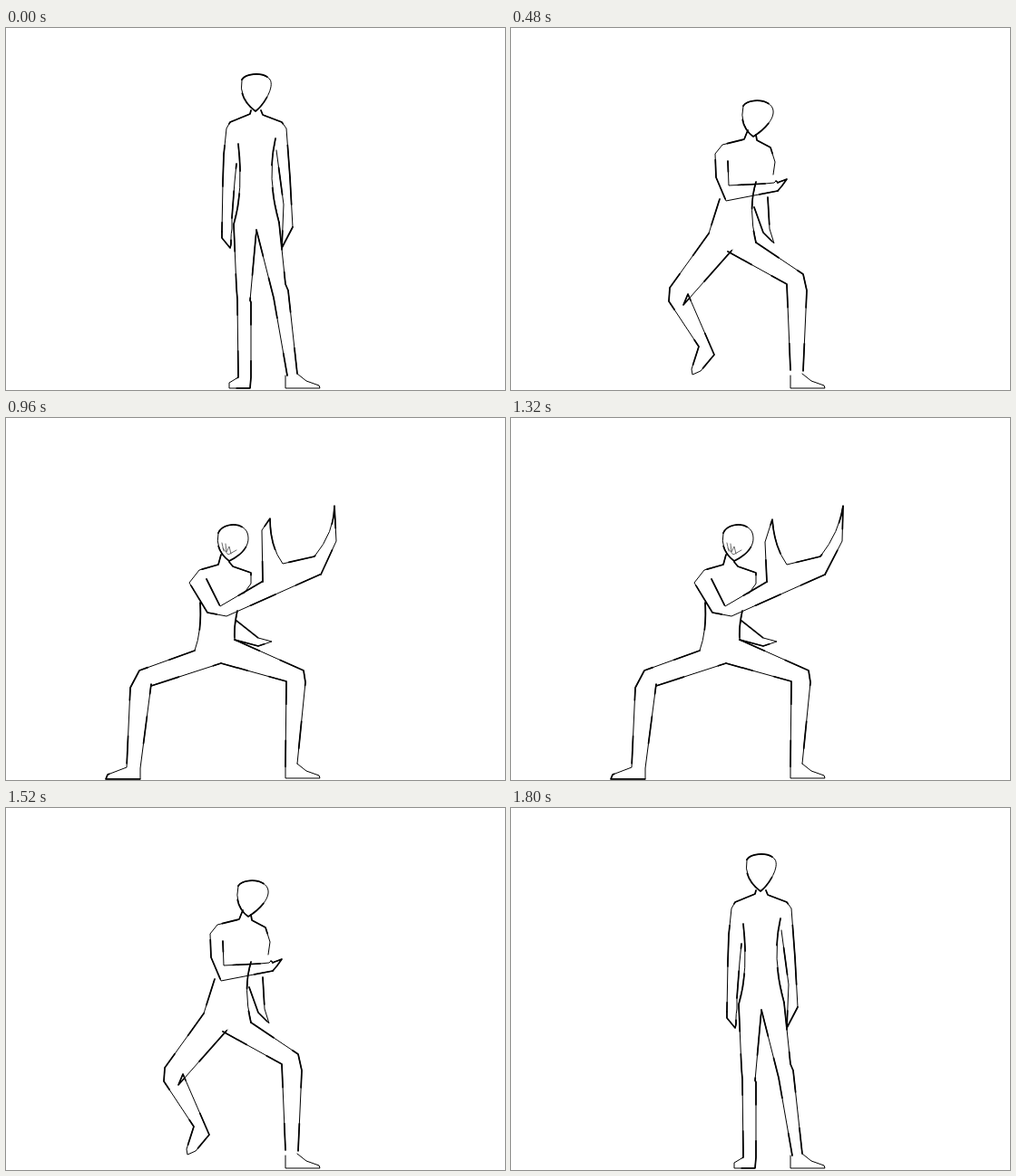
Write an HTML page without scripts that moves like this. It is 550 by 400 pixels and loops after 2 s.

```html
<!DOCTYPE html>
<html lang="en">
<head>
<meta charset="utf-8">
<title>Fighting stance</title>
<style>
html, body { margin: 0; width: 100%; height: 100%; overflow: hidden; background: #fff; }
svg { display: block; width: 100%; height: 100%; }
path { fill: none; stroke: #000; stroke-linecap: round; stroke-linejoin: round; }

/* Limb poses: --a stand, --b crouch, --g step, --d strike, --e guard */
.pose { --e: var(--d); d: var(--a); animation: pose 2s step-end infinite; }
@keyframes pose {
  0% { d: var(--a); }
  10% { d: var(--a); animation-timing-function: steps(2, jump-both); }
  16% { d: var(--b); }
  20% { d: var(--b); animation-timing-function: steps(1, jump-both); }
  24% { d: var(--g); }
  28% { d: var(--g); animation-timing-function: steps(2, jump-both); }
  32% { d: var(--d); }
  34% { d: var(--e); }
  66% { d: var(--d); }
  70% { d: var(--d); animation-timing-function: steps(2, jump-both); }
  76% { d: var(--g); }
  80% { d: var(--g); animation-timing-function: steps(3, jump-both); }
  90%, 100% { d: var(--a); }
}

/* Pen pressure: the same line again, heavier and broken */
.heavy { stroke-width: 1.7; stroke-dasharray: 30 25 45 40; }

.head {
  --a: path("M260 57C265 49 286 49 291 57S285 84 275 92Q256 78 260 57");
  --b: path("M259 65C264 57 285 57 290 66S284 92 273 100Q255 86 259 65");
  --g: path("M256 86C261 78 283 78 288 88S280 112 267 120Q251 108 256 86");
  --d: path("M234 127C239 115 262 115 266 127S262 150 246 158Q230 146 234 127");
}
.torso {
  --a: path("M256 128Q262 180 251 217M297 122Q287 165 301 215");
  --b: path("M254 131Q253 160 262 222M294 138Q287 165 304 235");
  --g: path("M230 189Q224 208 218 227M270 170Q261 200 270 237");
  --d: path("M214 204Q216 235 208 257M255 213Q251 230 252 245");
}
.rear-arm {
  --a: path("M281 91 283 96 304 104 309 111 313 165M313 165 316 220 304 243 306 195 298 135");
  --b: path("M279 98 280 103 299 109 307 119 311 166M311 166 313 224 305 240 301 190 296 134");
  --g: path("M270 118 271 124 286 132 291 148 289 162M283 187 285 222 290 238 278 226 268 198");
  --d: path("M246 159 250 164 270 171 270 183 262 194M254 224 278 243 293 247 278 252 252 245");
}
.lead-arm {
  --a: path("M270 91 269 95 247 104 243 111 240 140 239 170 238 225M249 210 252 170 254 150");
  --b: path("M268 98 267 104 253 108 241 122 243 150 245 172 251 222M258 200 257 168 255 130");
  --g: path("M261 113 257 123 233 129 225 139 226 165 237 191 294 180M280 172 240 174 239 147");
  --d: path("M237 151 234 162 213 168 202 182 222 215 243 219 346 173M282 181 236 208 221 178");
}
.hand {
  --a: path("M238 225 238 232 247 243Q248 240 248 238L248 232Q248 228 249 222L249 218 249 210");
  --b: path("M251 222 257 230 263 237Q263 234 262 230L261 226Q260 222 259 215L259 208 258 200");
  --g: path("M294 180 299 174 304 167Q299 169 296 170L294 171Q293 169 292 169L290 171 280 172");
  --d: path("M346 173 365 136 366 97Q362 126 341 153L304 162Q290 142 288 112L280 137 282 181");
  --e: path("M347 173 364 136 362 97Q362 126 340 153L305 161Q291 142 291 111L282 124 283 181");
}
.rear-leg {
  --a: path("M251 217 254 287 255 300 256 386 246 392 246 398 269 398 270 386 270 303 269 301 276 223");
  --b: path("M251 218 239 295 244 305 255 380 247 392 246 398 266 398 268 380 258 292 260 292 273 227");
  --g: path("M218 227 175 287 174 302 207 352 199 377 200 383 209 379 224 361 195 294 190 306 244 245");
  --d: path("M208 257 147 279 137 298 133 386 112 394 110 399 148 399 148 387 160 294 160 296 237 271");
}
.front-leg {
  --a: path("M301 215 308 283 311 290 321 382M276 223 295 298 310 384");
  --b: path("M304 235 314 276 316 283 321 382M273 227 299 294 309 384");
  --g: path("M270 237 322 272 326 290 322 379M239 247 304 283 308 378");
  --d: path("M252 245 328 279 330 292 321 382M237 271 309 291 308 385");
}

.face { stroke: #444; stroke-width: .8; animation: face 2s step-end infinite; }
@keyframes face {
  0%, 70% { visibility: hidden; }
  32% { visibility: visible; }
}
.dust { stroke: #555; animation: dust 2s step-end infinite; }
@keyframes dust {
  0%, 36% { visibility: hidden; }
  32% { visibility: visible; }
  34% { visibility: visible; transform: translateY(12px); }
}
.drop { animation: drop 2s step-end infinite; }
@keyframes drop {
  0%, 48% { visibility: hidden; transform: translate(10px, 130px); }
  38% { visibility: visible; transform: none; animation-timing-function: steps(5, jump-none); }
}
</style>
</head>
<body>
<svg viewBox="0 0 550 400">
  <path class="pose head"/>
  <path class="pose torso"/>
  <path class="pose rear-arm"/>
  <path class="pose lead-arm"/>
  <path class="pose hand"/>
  <path class="pose rear-leg"/>
  <path class="pose front-leg"/>
  <path d="M308 384V398H346L345 395 331 390 321 382"/>

  <path class="pose heavy head"/>
  <path class="pose heavy torso"/>
  <path class="pose heavy rear-arm"/>
  <path class="pose heavy lead-arm"/>
  <path class="pose heavy hand"/>
  <path class="pose heavy rear-leg"/>
  <path class="pose heavy front-leg"/>

  <path class="face" d="M238 138l2 9M242 139l1 9 3-6 2 8M239 144l6 7 9-5"/>
  <path class="dust" d="M334 109h2M327 123h1M379 139h2M319 207h1M348 292l2 3"/>
  <path class="drop" d="M264 142l1 2"/>
</svg>
</body>
</html>
```
